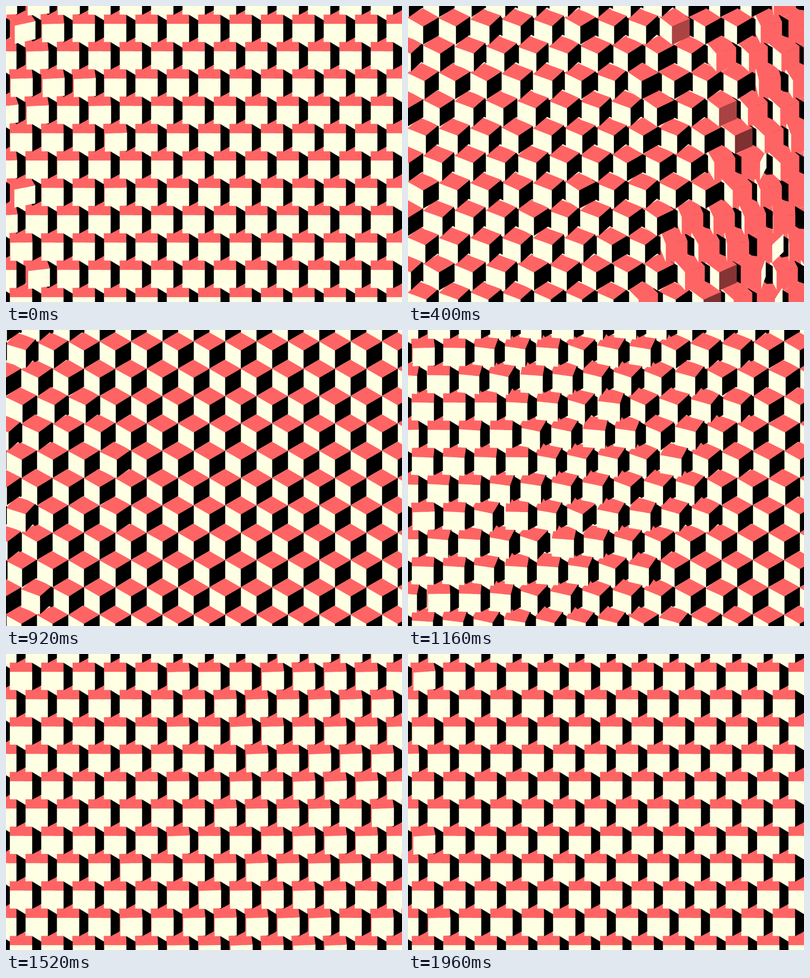
Animation, 800 px wide and 600 px high, one loop 2 s. Source, as an HTML page with a canvas:

```html
<!DOCTYPE html>
<html>
<head>
<meta charset="utf-8">
<style>
html, body { margin: 0; width: 100%; height: 100%; overflow: hidden; background: #ffffe4; }
canvas { display: block; }
</style>
</head>
<body>
<canvas id="stage" width="800" height="600"></canvas>
<script>
const ctx = document.getElementById('stage').getContext('2d');
const LOOP = 2000, TURN = 385, SETTLE = 494;
const RADIUS = 31.7, HALF = 18.3, TILT = Math.sqrt(1 / 3);
const CREAM = '#ffffe4', CORAL = [255, 100, 100], BLACK = '#000';

const clamp = v => Math.max(0, Math.min(1, v));
const mix = (a, b, k) => a + (b - a) * k;
const coral = dark => `rgb(${CORAL.map(c => Math.round(c * (1 - dark))).join()})`;

// Cubic ease in and out that swings past its end and comes back.
function swing(v) {
  const p = clamp(v);
  const cubic = p < 0.5 ? 4 * p ** 3 : 1 - 4 * (1 - p) ** 3;
  return cubic + 0.1 * Math.sin(Math.PI * clamp((v - 0.75) / 0.6)) ** 2;
}

function random(col, row, salt) {
  const n = Math.sin(col * 12.9898 + row * 78.233 + salt * 37.719) * 43758.5453;
  return n - Math.floor(n);
}

// A wave from the top left to the right, loosened by seeded noise.
function startTime(x, y, col, row) {
  const noise = random(col, row, 1) + random(col, row, 2) - 1;
  return -90 + 0.32 * x + 0.05 * y + 75 * noise;
}

// Painted from the bottom row up and from right to left.
const cells = [];
for (let row = 11; row >= -1; row--) {
  for (let col = 13; col >= -1; col--) {
    const x = (row % 2 ? -1.4 : 30.3) + 63.4 * col;
    const y = 41.4 + 55.4 * row;
    cells.push({ x, y, start: startTime(x, y, col, row) });
  }
}

function fill(points, color) {
  ctx.beginPath();
  for (const [x, y] of points) ctx.lineTo(x, y);
  ctx.closePath();
  ctx.fillStyle = ctx.strokeStyle = color;
  ctx.fill();
  ctx.stroke();
}

function pose({ start }, time) {
  const local = (time - start + LOOP) % LOOP;
  const turn = local / TURN;
  const settle = (local - 856 - 0.26 * start) / SETTLE;
  const back = clamp(swing(settle));
  return {
    angle: 135 * swing(turn) + 45 * swing(settle),
    dark: clamp((turn - 0.74) / 0.04),
    turning: turn > 0.4 && turn < 0.8,
    open: Math.max(1 - clamp((turn - 0.7) / 0.4), back),
    foot: Math.max(1 - clamp((turn - 0.3) / 0.35), back)
  };
}

function drawCell() {
  const w = RADIUS, h = HALF;
  fill([[0, -2 * h], [w, -h], [w, h], [0, 2 * h], [-w, h], [-w, -h]], coral(0));
}

function drawGap(open, foot) {
  const move = (x, y, side, k) => [mix(RADIUS, x, k), mix(side * HALF, y, k)];
  fill([[0, 0], move(22.5, -23.4, -1, open), move(40.7, -12.4, -1, open),
    move(40.7, 22.5, 1, open), move(22.5, 32, 1, foot)], BLACK);
}

function drawCube(angle, dark) {
  const corner = (deg, dy) => {
    const a = deg * Math.PI / 180;
    return [RADIUS * Math.sin(a), RADIUS * Math.cos(a) * TILT + dy];
  };
  [CREAM, coral(dark), CREAM, coral(0)].forEach((color, i) => {
    const facing = angle - 90 * i;
    if (Math.cos(facing * Math.PI / 180) < 0.002) return;
    const left = facing - 45, right = facing + 45;
    fill([corner(left, -HALF), corner(right, -HALF), corner(right, HALF), corner(left, HALF)], color);
  });
  fill([45, 135, 225, 315].map(d => corner(angle + d, -HALF)), coral(0));
}

function draw(time) {
  ctx.fillStyle = CREAM;
  ctx.fillRect(0, 0, 800, 600);
  ctx.lineWidth = 0.4;
  ctx.lineJoin = 'round';
  const poses = cells.map(cell => pose(cell, time));
  const at = ({ x, y }) => ctx.setTransform(1, 0, 0, 1, x, y);
  cells.forEach((cell, i) => {
    at(cell);
    if (poses[i].turning) drawCell();
  });
  cells.forEach((cell, i) => {
    const { angle, dark, open, foot } = poses[i];
    at(cell);
    drawGap(open, foot);
    drawCube(angle, dark);
  });
  ctx.setTransform(1, 0, 0, 1, 0, 0);
}

const origin = performance.now();
function tick() {
  draw((performance.now() - origin) % LOOP);
  requestAnimationFrame(tick);
}
tick();
</script>
</body>
</html>
```
